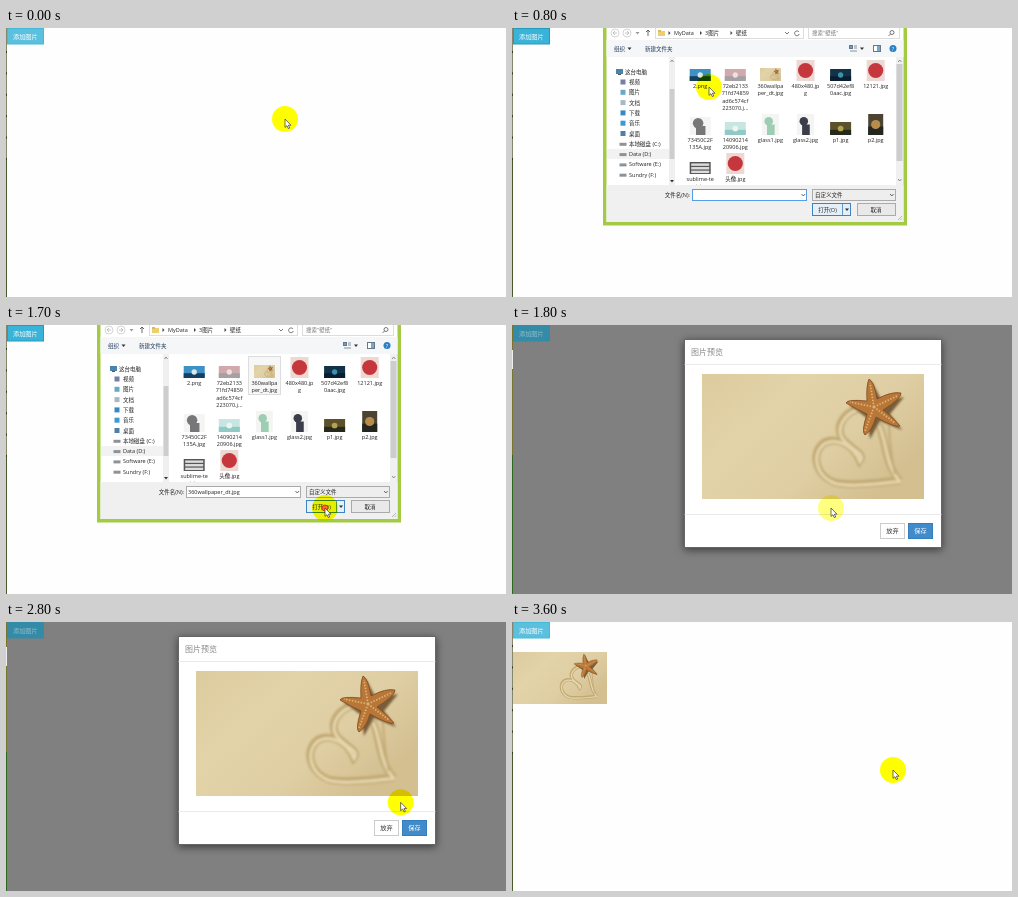
Recreate the animation shown at these times as an HTML page. Size 500 by 269 pixels, loop 3700 ms.

```html
<!DOCTYPE html>
<html lang="zh">
<head>
<meta charset="utf-8">
<style>
html, body { margin: 0; width: 100%; height: 100%; overflow: hidden; background: #fefefe; }
svg { display: block; width: 500px; height: 269px; }
text { font: 6.2px "Open Sans", "Noto Sans CJK SC", "Noto Sans CJK", sans-serif; white-space: pre; }
#dialog text { font-size: 5.5px; }
#halo { mix-blend-mode: multiply; }
#modalBox { filter: drop-shadow(0 2px 4px rgba(0,0,0,.55)); }
</style>
</head>
<body>
<svg viewBox="0 0 500 269">
  <defs>
    <linearGradient id="sand" x2="1" y2=".6">
      <stop offset="0" stop-color="#dccb9d"/><stop offset=".35" stop-color="#e3d3a9"/>
      <stop offset=".7" stop-color="#dfcea3"/><stop offset="1" stop-color="#d3bf90"/>
    </linearGradient>
    <filter id="soft"><feGaussianBlur stdDeviation="1"/></filter>
    <symbol id="beach" viewBox="0 0 222 125" preserveAspectRatio="none">
      <rect width="222" height="125" fill="url(#sand)"/>
      <g filter="url(#soft)" fill="none">
        <path id="heart" d="M197 106C175 108 150 112 132 108C112 100 108 78 122 68C134 62 150 70 157 86C163 78 150 76 140 64C132 52 142 38 156 34M176 50C184 66 182 90 197 106" stroke="#c2aa75" stroke-width="7"/>
        <use href="#heart" stroke-width="4" style="stroke:#dcc99b" transform="translate(1 1)"/>
        <path d="M197 106C175 108 150 112 132 108C112 100 108 78 122 68C134 62 150 70 157 86C163 78 150 76 140 64C132 52 142 38 156 34M176 50C184 66 182 90 197 106" stroke="#e6d6ad" stroke-width="3" transform="translate(1 1.5)"/>
        <path d="M187 50Q188 78 193 100" stroke="#c3aa77" stroke-width="2"/>
        <path d="M170 8L180 27L202 23L188 40L200 56L178 47L168 65L165 44L147 31L166 29Z" fill="#5e4222" opacity=".8"/>
      </g>
      <path d="M167 5Q172 7 175 25Q190 17 199 19Q200 24 181 36Q192 44 198 52Q193 54 174 43Q170 57 163 61Q159 58 165 40Q154 35 144 29Q145 25 165 27Q164 12 167 5Z" fill="#b87637" stroke="#7d4c23" stroke-width=".8"/>
      <path d="M172 33L168 9M172 33L195 22M172 33L193 49M172 33L163 57M172 33L148 28" stroke="#dfb072" stroke-width="1.8" stroke-dasharray="1.5 1.5"/>
    </symbol>
  </defs>
  <rect width="500" height="269" fill="#fefefe"/>
  <g id="page"></g>
  <use id="saved" href="#beach" x="1" y="30" width="94" height="52"/>
  <g id="dialog"></g>
  <g id="modal"></g>
  <circle id="halo" r="13" fill="#ff0"/>
  <circle id="press" r="3" fill="#f63" stroke="#d22" opacity=".9"/>
  <path id="arrow" d="M0 0V8.4L2 6.7L3.3 9.6L4.7 9L3.4 6.2H6Z" fill="#fff" stroke="#334" stroke-width=".7"/>
</svg>
<script>
const $ = id => document.getElementById(id);
const rect = (x, y, w, h, fill, extra = '') => `<rect x="${x}" y="${y}" width="${w}" height="${h}" fill="${fill}" ${extra}/>`;
const box = (x, y, w, h, fill, line, extra = '') => rect(x + .5, y + .5, w - 1, h - 1, fill, `stroke="${line}" ${extra}`);
const text = (x, y, s, fill = '#222', extra = '') => `<text x="${x}" y="${y}" fill="${fill}" ${extra}>${s}</text>`;
const disc = (x, y, r, fill, extra = '') => `<circle cx="${x}" cy="${y}" r="${r}" fill="${fill}" ${extra}/>`;
const line = (d, stroke = '#777', w = .8) => `<path d="${d}" fill="none" stroke="${stroke}" stroke-width="${w}"/>`;
const down = (x, y, fill = '#333') => `<path d="M${x - 2} ${y - 1}h4l-2 2.5z" fill="${fill}"/>`;
const center = 'text-anchor="middle"';

function page() {
  let s = rect(0, 0, 1, 130, '#85866a') + rect(0, 130, 1, 139, '#4a5b2b');
  for (let i = 0; i < 6; i++) s += rect(0, 23 + i * 21.4, 1, 2, '#33382a');
  return s + box(1, 0, 37, 16.5, '#5bc0de', '#46b8da', 'id="add"') + text(7, 10.6, '添加图片', '#fff');
}

// Thumbnail painters take left, top, width and height.
const avatar = (x, y, w, h) => rect(x, y, w, h, '#ecd9d4') + disc(x + w / 2, y + h / 2, w * .42, '#c5373c');
const flat = (a, b, c) => (x, y, w, h) => rect(x, y, w, h, a) + rect(x, y + h * .6, w, h * .4, b) + disc(x + w * .5, y + h * .5, h * .22, c);
const sketch = c => (x, y, w, h) => rect(x, y, w, h, '#f4f5f3') + disc(x + w * .4, y + h * .35, w * .25, c) + rect(x + w * .3, y + h * .5, w * .45, h * .5, c);
const beach = (x, y, w, h) => `<use href="#beach" x="${x}" y="${y}" width="${w}" height="${h}"/>`;
const keys = (x, y, w, h) => rect(x, y, w, h, '#555') + [.12, .42, .72].map(k => rect(x + 1.5, y + h * k, w - 3, h * .2, '#ddd')).join('');

const files = [
  [0, 53, 21, 12, flat('#3d91c4', '#173f63', '#d6e9ee'), '2.png'],
  [1, 53, 21, 12, flat('#cfa9ac', '#a5a0a5', '#f0dfd5'), '72eb2133', '71fd74859', 'ad6c574cf', '223070.j...'],
  [2, 53, 21, 13, beach, '360wallpa', 'per_dt.jpg'],
  [3, 53, 18, 21, avatar, '480x480.jp', 'g'],
  [4, 53, 21, 12, flat('#123247', '#0a1d31', '#3c91ad'), '507d42ef8', '0aac.jpg'],
  [5, 53, 18, 21, avatar, '12121.jpg'],
  [0, 107, 21, 18, sketch('#777779'), '73450C2F', '135A.jpg'],
  [1, 107, 21, 13, flat('#c7e6e2', '#8fcbc4', '#eef5f1'), '14090214', '20906.jpg'],
  [2, 107, 17, 21, sketch('#9dceb3'), 'glass1.jpg'],
  [3, 107, 17, 21, sketch('#3b3d4b'), 'glass2.jpg'],
  [4, 107, 21, 13, flat('#5c512b', '#262a1b', '#b4a34e'), 'p1.jpg'],
  [5, 107, 15, 21, flat('#4b4432', '#242720', '#b88d4b'), 'p2.jpg'],
  [0, 146, 21, 12, keys, 'sublime-te', 'xt.jpg'],
  [1, 146, 18, 21, avatar, '头像.jpg']
];

function fileList() {
  return files.map(([col, bottom, w, h, paint, ...names]) => {
    const x = 188.2 + col * 35.1;
    return paint(x - w / 2, bottom - h, w, h) +
      names.map((n, i) => text(x, bottom + 6.8 + i * 7.4, n, '#222', center)).join('');
  }).join('');
}

function navigation() {
  const places = ['视频', '图片', '文档', '下载', '音乐', '桌面', '本地磁盘 (C:)', 'Data (D:)', 'Software (E:)', 'Sundry (F:)'];
  const tints = ['#777fa5', '#66aac8', '#a8b8c4', '#348bc4', '#3a9ad4', '#4f7fa8'];
  let s = rect(95, 121, 62, 10, '#f2f2f2') + rect(104, 41, 7, 5, '#4c83aa') + rect(106, 46, 3, 1, '#555') + text(113, 46, '这台电脑');
  places.forEach((name, i) => {
    const y = 54 + i * 10.3;
    s += i < 6 ? rect(108.5, y - 2.5, 5, 5, tints[i]) : rect(107.5, y - 1, 7, 3, '#8b9399');
    s += text(117, y + 2, name);
  });
  return s + rect(157, 29, 6, 128, '#f0f0f0') + rect(157.5, 61, 5, 70, '#cdcdcd') + down(160, 153) + line('M158.5 34l1.5-2 1.5 2');
}

function dialog() {
  const grey = '#b5b5b5';
  let s = rect(91, 0, 304, 197.5, '#a2cb43') + rect(94.5, 0, 297, 194, '#fff');
  s += disc(103, 5, 4, '#fff', 'stroke="#ccc" stroke-width=".8"') + disc(115, 5, 4, '#fff', 'stroke="#ccc" stroke-width=".8"');
  s += line('M105 5h-4l2-2m-2 2l2 2M113 5h4l-2-2m2 2l-2 2', grey) + down(125.5, 5, '#999') + line('M136 8V2l-2 2m2-2l2 2', '#444');
  s += box(143, -2, 149, 13, '#fff', '#ddd') + rect(146, 3, 7, 5, '#edcf72') + rect(146, 2, 3, 2, '#dcb955');
  [156.5, 188, 218.5].forEach(x => s += `<path d="M${x} 3l2 2-2 2z" fill="#444"/>`);
  s += text(162, 7.2, 'MyData') + text(193, 7.2, '3图片') + text(224, 7.2, '壁纸');
  s += line('M273 4l2 2 2-2M287 4a2.4 2.4 0 1 0 .3 2', '#555') + box(296, -2, 92, 13, '#fff', '#ddd');
  s += text(300, 7.2, '搜索"壁纸"', '#777') + disc(380, 4.5, 2, 'none', 'stroke="#555" stroke-width=".8"') + line('M378.5 6l-2 2', '#555');
  s += rect(94.5, 12, 297, 17, '#f5f6f7') + text(102, 22.5, '组织', '#1e395b') + down(117.5, 20.5) + text(133, 22.5, '新建文件夹', '#1e395b');
  s += box(337, 17, 4, 4, '#6d9cc4', '#678') + line('M342 18h3M342 20h3M338 23h7', '#678') + down(350, 20.5);
  s += box(361, 17, 8, 7, '#fff', '#678') + rect(365, 18, 3, 5, '#75a8d0') + disc(381, 20.5, 3.5, '#2b80c5') + text(381, 22.5, '?', '#fff', center);
  s += box(242, 31, 33, 39, '#fff', '#ddd', 'id="pick"') + fileList() + navigation();
  s += rect(384, 29, 7, 128, '#f0f0f0') + rect(384.5, 36, 6, 97, '#cdcdcd') + line('M386 34l1.7-2 1.7 2') + line('M386 151l1.7 2 1.7-2');
  s += rect(94.5, 157, 297, 37, '#f0f0f0') + text(178, 169, '文件名(N):', '#222', 'text-anchor="end"');
  s += box(180, 161, 115, 12, '#fff', '#569de5', 'id="field"') + text(182, 169, '', '#222', 'id="name"') + line('M289.5 166l1.8 2 1.8-2', '#444');
  s += box(300, 161, 84, 12, '#eee', '#aaa') + text(303, 169, '自定义文件') + line('M378 166l1.8 2 1.8-2', '#444');
  s += box(300, 175, 39, 13, '#e4eff8', '#3d83bd') + line('M330.5 176v11', '#3d83bd') + text(315.5, 183.7, '打开(O)', '#222', center) + down(335, 181.5);
  return s + box(345, 175, 39, 13, '#e9e9e9', '#aaa') + text(364, 183.7, '取消', '#222', center) + line('M386 192l4-4M388.5 192l1.5-1.5', '#aaa');
}

function modal() {
  let s = rect(0, 0, 500, 269, '#808080') + rect(0, 0, 1, 130, '#77752f') + rect(0, 25, 1, 19, '#eee') + rect(0, 130, 1, 139, '#2b691d');
  s += rect(1, 0, 37, 16.5, '#338ba8') + text(7, 10.6, '添加图片', '#93bfcb');
  s += box(172, 14, 258, 209, '#fff', '#666', 'id="modalBox"');
  s += text(179, 29.7, '图片预览', '#888', 'style="font-size:8px;font-weight:300"') + line('M172.5 39.5h257M172.5 189.5h257', '#e5e5e5');
  s += beach(190, 49, 222, 125) + box(368, 198, 25, 16, '#fff', '#ccc') + text(380.5, 208.3, '放弃', '#333', center);
  return s + box(396, 198, 25, 16, '#428bca', '#357ebd', 'id="save"') + text(408.5, 208.3, '保存', '#fff', center);
}

$('page').innerHTML = page();
$('dialog').innerHTML = dialog();
$('modal').innerHTML = modal();

// Pointer stops: time, x, y
const stops = [
  [0, 279, 91], [300, 24, 11], [400, 20, 10], [600, 137, 71], [1000, 257, 47], [1200, 257, 47],
  [1600, 319, 183], [1800, 319, 183], [2200, 362, 154], [2400, 380, 123], [3000, 402, 209],
  [3400, 411.5, 208], [3600, 381, 148]
];

function pointer(t) {
  const i = Math.max(1, stops.findIndex(s => s[0] >= t));
  const [a, b] = [stops[i - 1], stops[i]];
  const k = (t - a[0]) / (b[0] - a[0]);
  return [1, 2].map(n => a[n] + (b[n] - a[n]) * k);
}

const within = (t, from, to) => t >= from && t < to;
const show = (id, on) => $(id).style.display = on ? '' : 'none';

function paint(id, fill, stroke) {
  $(id).setAttribute('fill', fill);
  $(id).setAttribute('stroke', stroke);
}

function draw(now) {
  const t = Math.floor(now % 3700 / 100) * 100;
  const place = `translate(${pointer(t)})`;
  ['halo', 'press', 'arrow'].forEach(id => $(id).setAttribute('transform', place));
  show('dialog', within(t, 700, 1800));
  show('modal', within(t, 1800, 3500));
  show('saved', t >= 3500);
  show('press', t === 400 || t === 1100 || t === 1700);
  show('pick', t >= 1000);
  $('halo').setAttribute('opacity', within(t, 1800, 2400) ? .5 : 1);
  paint('add', ...(within(t, 300, 3500) ? ['#39b3d7', '#269abc'] : ['#5bc0de', '#46b8da']));
  paint('save', ...(t >= 2900 ? ['#3276b1', '#285e8e'] : ['#428bca', '#357ebd']));
  paint('pick', ...(within(t, 1000, 1300) ? ['#e5f3fb', '#70c0e7'] : ['#f7f7f7', '#ddd']));
  paint('field', '#fff', t >= 1200 ? '#aaa' : '#569de5');
  $('name').textContent = t >= 1200 ? '360wallpaper_dt.jpg' : '';
  requestAnimationFrame(() => draw(performance.now()));
}
draw(0);
</script>
</body>
</html>
```
